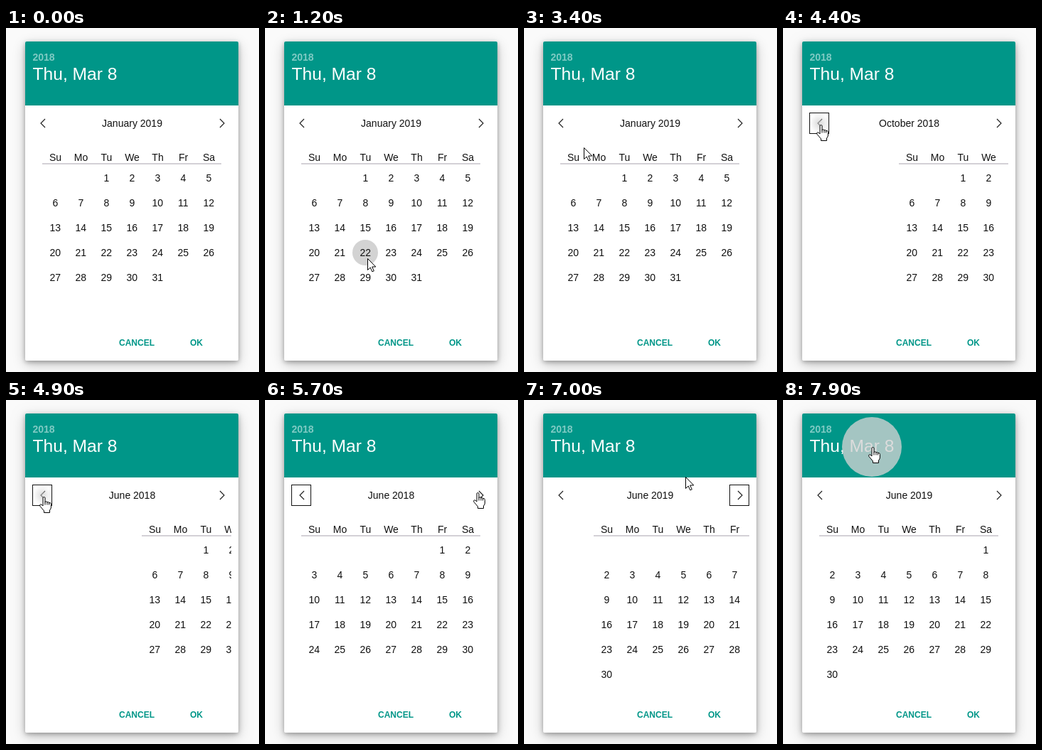
Animation of 356 by 484 pixels, one loop 8000 ms. Source, as an HTML page with a canvas:

```html
<!DOCTYPE html>
<html lang="en">
<head>
<meta charset="utf-8">
<title>Date picker</title>
<style>
html, body { margin: 0; width: 100%; height: 100%; overflow: hidden; background: #fafafa; }
canvas { display: block; width: 356px; height: 484px; }
</style>
</head>
<body>
<canvas id="stage" width="356" height="484"></canvas>
<script>
const ctx = document.getElementById('stage').getContext('2d');
const LOOP = 8000, STEP = 100;
const TEAL = '#009688', INK = '#111', HOVER = '#d3d3d3';
const FONT = '"Liberation Sans", Arial, sans-serif';
const MONTHS = 'January February March April May June July August September October November December'.split(' ');
const DAYS = ['Su', 'Mo', 'Tu', 'We', 'Th', 'Fr', 'Sa'];

// Month changes: back seven times, then forward twelve times
const START = 2019 * 12, SLIDE = 200, WIDTH = 280;
const clicks = [];
for (let i = 0; i < 7; i++) clicks.push({ at: 4080 + i * 120, dir: -1 });
for (let i = 0; i < 12; i++) clicks.push({ at: 5740 + i * 85.6, dir: 1 });
const HEADER_CLICK = 7700;

// Pointer path: time, x, y
const PATH = [
  [400, 18, 230], [700, 62, 256], [1000, 122, 302], [1200, 144, 324],
  [1600, 190, 300], [2000, 248, 262], [2500, 237, 215], [2900, 172, 212],
  [3400, 84, 168], [3800, 52, 136], [5200, 52, 136], [5600, 298, 130],
  [6700, 298, 130], [7000, 227, 108], [7500, 125, 66], [LOOP, 125, 66]
];

const ARROW = new Path2D('M.5 .5V16.5L4.2 13L6.8 18.8L9.3 17.8L6.7 12H11.8Z');
const HAND = new Path2D('M5 13V2Q5 .5 6.5 .5T8 2V8Q8 6.8 9.5 6.8T11 8.3Q11 7.5 12.3 7.5T13.6 9' +
  'Q13.8 8.3 15 8.5T16.4 10.5V15Q16.4 17 14.5 19V22.5H6.5V20Q4 17 1 13.5Q0 11.5 1.5 10.8Q3 10.6 5 13Z' +
  'M8 8V11.5M11 8.3V11.5M13.6 9V11.5');

function pointer(t) {
  const i = PATH.findIndex(p => p[0] > t);
  if (i < 1) return null;
  const [t0, x0, y0] = PATH[i - 1], [t1, x1, y1] = PATH[i];
  const k = (t - t0) / (t1 - t0);
  return { x: Math.round(x0 + (x1 - x0) * k), y: Math.round(y0 + (y1 - y0) * k) };
}

const inside = (p, x, y, w, h) => p && p.x >= x && p.x <= x + w && p.y >= y && p.y <= y + h;

// Each click restarts the slide out; the grid swaps only once it is off stage
function calendar(t) {
  let title = START, shown = START, shift = 0, last = null;
  clicks.forEach((c, i) => {
    if (c.at > t) return;
    title += c.dir;
    last = c;
    const next = clicks[i + 1];
    const until = next && next.at <= t ? next.at : t;
    const age = until - c.at;
    if (age >= SLIDE) shown = title;
    const rest = Math.max(0, 1 - (age - SLIDE) / SLIDE);
    shift = age < SLIDE ? -c.dir * WIDTH * age / SLIDE : c.dir * WIDTH * rest * rest;
  });
  return { title, shown, shift, last };
}

function text(s, x, y, size, color = INK, align = 'center', weight = '') {
  ctx.font = `${weight} ${size}px ${FONT}`;
  ctx.fillStyle = color;
  ctx.textAlign = align;
  ctx.fillText(s, x, y);
}

function disc(x, y, r, color) {
  ctx.fillStyle = color;
  ctx.beginPath();
  ctx.arc(x, y, r, 0, Math.PI * 2);
  ctx.fill();
}

function cardShadow(dy, blur, alpha) {
  ctx.save();
  ctx.shadowColor = `rgba(0,0,0,${alpha})`;
  ctx.shadowBlur = blur;
  ctx.shadowOffsetY = dy;
  ctx.fillStyle = '#fff';
  ctx.beginPath();
  ctx.roundRect(27, 19, 300, 449, 2);
  ctx.fill();
  ctx.restore();
}

function card() {
  ctx.fillStyle = '#fafafa';
  ctx.fillRect(0, 0, 356, 484);
  cardShadow(5, 18, .22);
  cardShadow(2, 6, .3);
  ctx.fillStyle = TEAL;
  ctx.beginPath();
  ctx.roundRect(27, 19, 300, 90, [2, 2, 0, 0]);
  ctx.fill();
  text('2018', 37.5, 46, 14, 'rgba(255,255,255,.5)', 'left', 'bold');
  text('Thu, Mar 8', 37.5, 73, 24.6, '#fff', 'left');
  text('CANCEL', 184, 447, 12, TEAL, 'center', 'bold');
  text('OK', 268, 447, 12, TEAL, 'center', 'bold');
}

function grid({ shown, shift }, p) {
  const year = Math.floor(shown / 12), month = shown % 12;
  const first = new Date(year, month, 1).getDay();
  const count = new Date(year, month + 1, 0).getDate();
  ctx.save();
  ctx.beginPath();
  ctx.rect(37, 160, WIDTH, 260);
  ctx.clip();
  ctx.translate(Math.round(shift), 0);
  DAYS.forEach((d, i) => text(d, 69.5 + i * 36, 187, 14));
  ctx.fillStyle = '#a8a2ae';
  ctx.fillRect(51, 190.5, 252, 1);
  for (let d = 1; d <= count; d++) {
    const slot = first + d - 1;
    const x = 69 + slot % 7 * 36, y = 211 + Math.floor(slot / 7) * 35;
    if (p && !shift && Math.hypot(p.x - x, p.y - y) < 18) disc(x, y, 18, HOVER);
    text(d, x + .3, y + 5, 14);
  }
  ctx.restore();
}

function chevron(x, dir) {
  ctx.strokeStyle = '#222';
  ctx.lineWidth = 1.2;
  ctx.beginPath();
  ctx.moveTo(x - 3 * dir, 128);
  ctx.lineTo(x + 3 * dir, 134);
  ctx.lineTo(x - 3 * dir, 140);
  ctx.stroke();
}

function navigation(t, { title, last }) {
  text(`${MONTHS[title % 12]} ${Math.floor(title / 12)}`, 177.5, 139, 14);
  chevron(52, -1);
  chevron(304, 1);
  if (!last || t >= HEADER_CLICK) return;
  const x = last.dir < 0 ? 51 : 303;
  const age = t - last.at;
  if (age < 250) {
    const glow = ctx.createRadialGradient(x, 134, 3, x, 134, 14);
    glow.addColorStop(0, `rgba(205,205,205,${.8 * (1 - age / 300)})`);
    glow.addColorStop(1, 'rgba(205,205,205,0)');
    disc(x, 134, 14, glow);
  }
  ctx.strokeStyle = '#111';
  ctx.lineWidth = 1;
  ctx.strokeRect(x - 13.5, 119.5, 27, 29);
}

function cursor(p) {
  if (!p) return;
  const hand = inside(p, 37, 119, 28, 30) || inside(p, 289, 119, 28, 30) || inside(p, 37, 34, 120, 44);
  ctx.save();
  ctx.translate(p.x - (hand ? 5 : 0), p.y);
  ctx.lineWidth = 1;
  ctx.lineJoin = 'round';
  ctx.fillStyle = '#fff';
  ctx.strokeStyle = '#000';
  const shape = hand ? HAND : ARROW;
  ctx.fill(shape);
  ctx.stroke(shape);
  ctx.restore();
}

function draw(now) {
  const t = Math.floor(now % LOOP / STEP) * STEP;
  const p = pointer(t), state = calendar(t);
  card();
  navigation(t, state);
  grid(state, p);
  if (t >= HEADER_CLICK) disc(125, 66, 42 * (t - HEADER_CLICK) / 200, 'rgba(211,211,211,.78)');
  cursor(p);
}

const begin = performance.now();
function tick() {
  draw(performance.now() - begin);
  requestAnimationFrame(tick);
}
tick();
</script>
</body>
</html>
```
